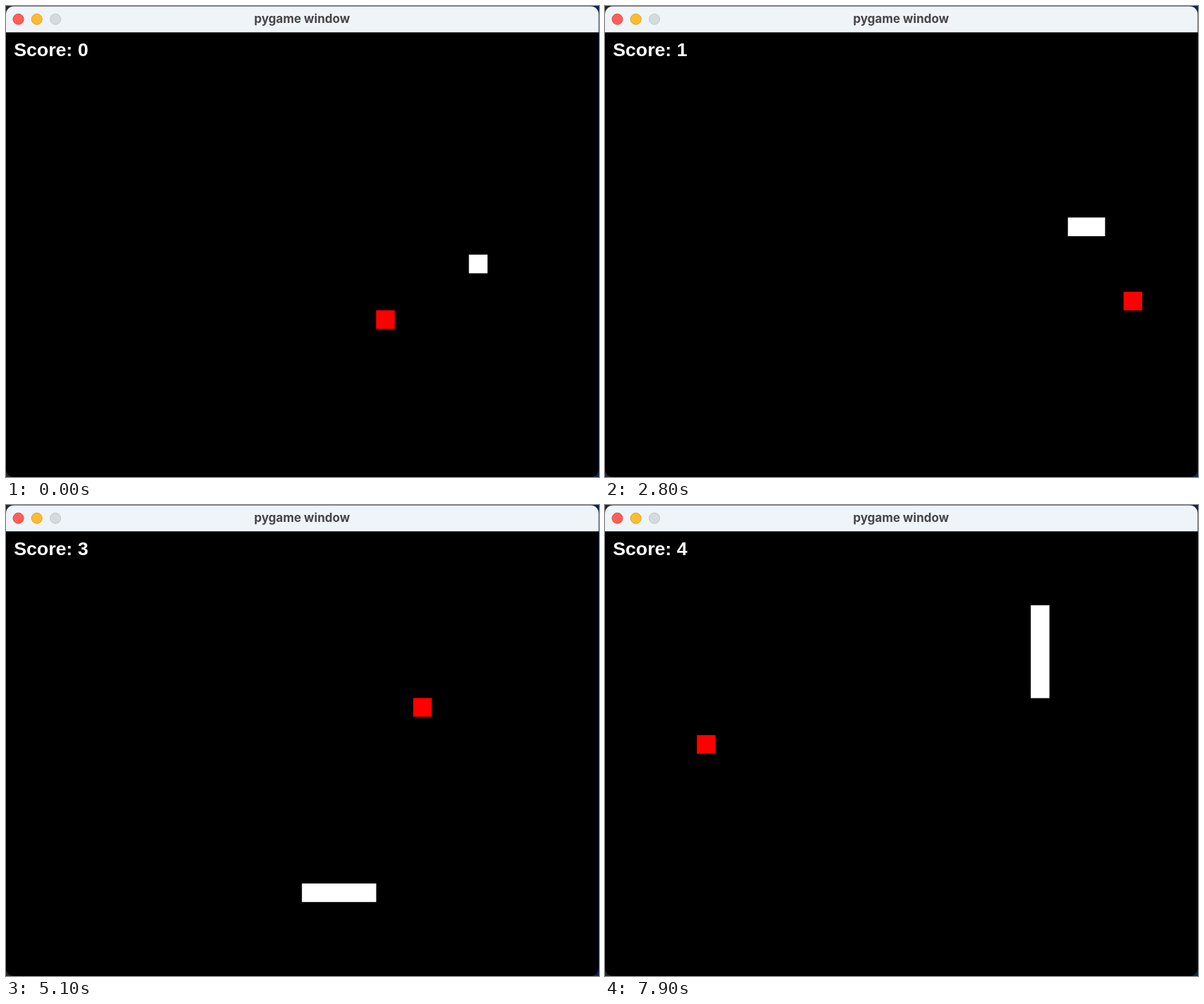
Recreate the animation shown at these times as an HTML page. Size 840 px wide and 667 px high, loop 8 s.

```html
<!DOCTYPE html>
<html lang="en">
<head>
<meta charset="utf-8">
<title>pygame window</title>
<style>
html, body { margin: 0; width: 100%; height: 100%; overflow: hidden; background: #0b1a30; }
svg { display: block; }
.title { font: 700 17px Inter, sans-serif; fill: #454549; text-anchor: middle; }
.score { font: 700 26.7px "Liberation Sans", Arial, sans-serif; fill: #fff; }
</style>
</head>
<body>
<svg width="840" height="667" viewBox="0 0 840 667">
  <defs>
    <clipPath id="frame"><rect y="0.6" width="839.5" height="666.4" rx="11"/></clipPath>
    <linearGradient id="desk"><stop stop-color="#25272b"/><stop offset="1" stop-color="#06255a"/></linearGradient>
  </defs>
  <rect width="840" height="667" fill="url(#desk)"/>
  <g clip-path="url(#frame)">
    <rect width="840" height="667"/>
    <rect width="840" height="37.3" fill="#eff4f8"/>
  </g>
  <g stroke-width="1">
    <circle cx="17.5" cy="18.7" r="7.5" fill="#ff5f57" stroke="#e2463f"/>
    <circle cx="43.7" cy="18.7" r="7.5" fill="#febc2e" stroke="#e0a028"/>
    <circle cx="70" cy="18.7" r="7.5" fill="#d5dadd" stroke="#c2c7ca"/>
  </g>
  <text class="title" x="419.3" y="24">pygame window</text>
  <text class="score" x="11.2" y="71.3">Score: <tspan id="score">0</tspan></text>
  <g fill="none" stroke-width="26.4" stroke-linecap="square">
    <path id="food" stroke="#f00"/>
    <path id="snake" stroke="#fff"/>
  </g>
</svg>
<script>
const LOOP = 8000, TICK = 100;
const corners = [[25, 12], [25, 19], [20, 19], [20, 10], [28, 10], [28, 19], [13, 19], [13, 9], [23, 9], [23, 4]];
const foods = [[20, 15], [28, 14], [18, 19], [22, 9], [5, 11]];
// Uneven start; afterwards the snake moves one cell per tick.
const startSteps = [0, 0, 2, 3, 3, 4, 5, 6, 7, 9, 9, 11, 11, 13, 14, 15, 15];

// Every cell the head visits, in order
const route = [corners[0]];
for (const [cx, cy] of corners.slice(1)) {
  let [x, y] = route.at(-1);
  while (x !== cx || y !== cy) {
    x += Math.sign(cx - x);
    y += Math.sign(cy - y);
    route.push([x, y]);
  }
}
const eaten = foods.slice(0, -1).map(([x, y]) => route.findIndex(c => c[0] === x && c[1] === y));

const el = id => document.getElementById(id);
const centre = ([x, y]) => `${(26.28 * x + 11.9).toFixed(2)} ${(26.26 * y + 50.2).toFixed(2)}`;
const line = cells => "M" + [cells[0], ...cells].map(centre).join("L");

function draw(now) {
  const tick = Math.floor(now % LOOP / TICK);
  const step = startSteps[tick] ?? tick - 1;
  const score = eaten.filter(n => n <= step).length;
  const length = 1 + eaten.filter(n => n < step).length; // grows one step after eating
  el("score").textContent = score;
  el("food").setAttribute("d", line([foods[score]]));
  el("snake").setAttribute("d", line(route.slice(Math.max(0, step - length + 1), step + 1)));
}

function loop(now) {
  draw(now);
  requestAnimationFrame(loop);
}
draw(0);
requestAnimationFrame(loop);
</script>
</body>
</html>
```
